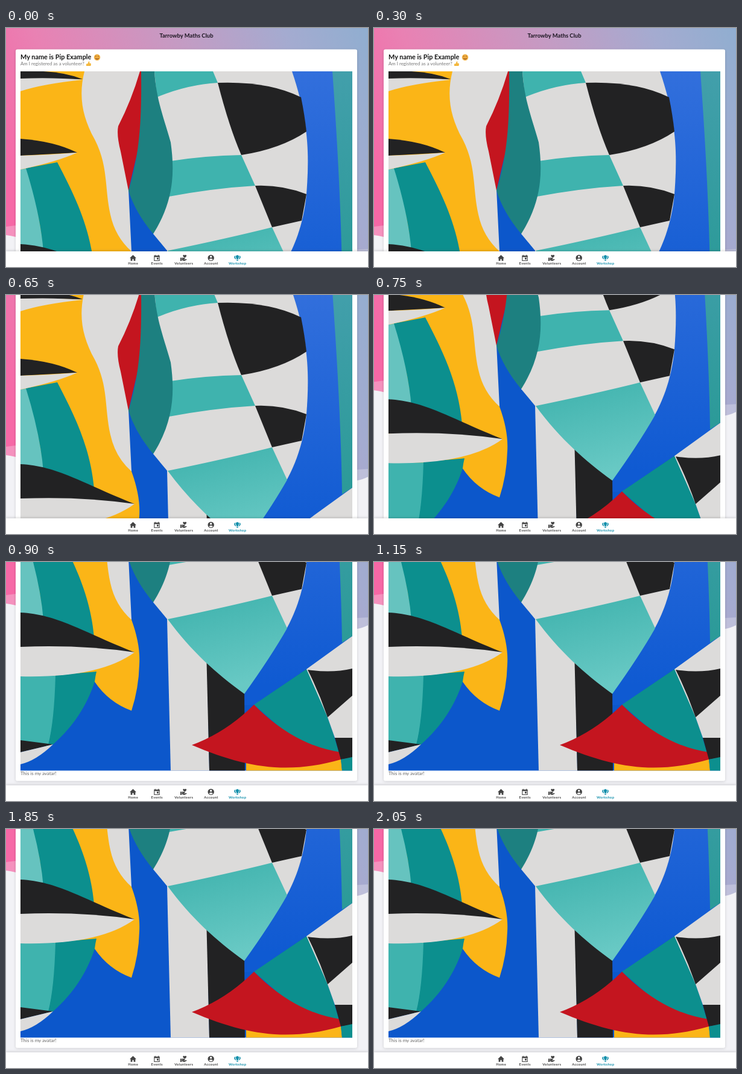
Write an HTML page that moves like this. It is 600 by 397 pixels and loops after 2100 ms.

```html
<!DOCTYPE html>
<html lang="en">
<head>
<meta charset="utf-8">
<title>Profile page scroll</title>
<style>
  html, body { margin: 0; width: 100%; height: 100%; overflow: hidden; background: #f2f2f6; }
  svg { display: block; width: 100vw; height: 100vh; }
  text { font-family: Lato, "Open Sans", sans-serif; }
  .white { fill: #dcdbda; }
  .black { fill: #222223; }
  .yellow { fill: #fbb517; }
  .teal { fill: #0c8f8e; }
  .aqua { fill: #3fb3ae; }
  .pale { fill: #66c3bf; }
  .deep { fill: #1d8080; }
  .blue { fill: #0c57cb; }
  .red { fill: #c4151f; }
  .nav { fill: #444; font-size: 5.7px; font-weight: 700; text-anchor: middle; letter-spacing: .38px; }
  .nav .active, .active { fill: #128fab; }
</style>
</head>
<body>
<svg viewBox="0 0 600 397" preserveAspectRatio="none">
  <defs>
    <linearGradient id="sky" gradientUnits="userSpaceOnUse" x1="0" y1="240" x2="600" y2="0">
      <stop offset="0" stop-color="#f668a6"/>
      <stop offset=".2" stop-color="#e981b3"/>
      <stop offset=".55" stop-color="#c39cc4"/>
      <stop offset=".8" stop-color="#a4abd0"/>
      <stop offset="1" stop-color="#90aed0"/>
    </linearGradient>
    <linearGradient id="rightBlue" gradientUnits="userSpaceOnUse" x1="0" y1="72" x2="0" y2="480">
      <stop offset="0" stop-color="#326fdc"/>
      <stop offset="1" stop-color="#0f5ad2"/>
    </linearGradient>
    <linearGradient id="rightTeal" gradientUnits="userSpaceOnUse" x1="0" y1="72" x2="0" y2="409">
      <stop offset="0" stop-color="#429fab"/>
      <stop offset="1" stop-color="#2b9a98"/>
    </linearGradient>
    <linearGradient id="kite" x1="0" y1="0" x2=".3" y2="1">
      <stop offset="0" stop-color="#3db1ac"/>
      <stop offset="1" stop-color="#68c9c4"/>
    </linearGradient>
    <filter id="shadow" x="-5%" y="-5%" width="110%" height="110%">
      <feDropShadow dx="0" dy="1" stdDeviation="2" flood-opacity=".16"/>
    </filter>
    <filter id="navShadow" x="-5%" y="-50%" width="110%" height="200%">
      <feDropShadow dx="0" dy="-1" stdDeviation="2" flood-opacity=".16"/>
    </filter>
    <clipPath id="photo"><rect x="24" y="72" width="550" height="549.5"/></clipPath>
  </defs>

  <rect width="600" height="397" fill="#f2f2f6"/>
  <g id="page">
    <path fill="url(#sky)" opacity=".7" d="M0 0H600V380Q590 385 582 386L16 347Q8 345 0 344Z"/>
    <path fill="url(#sky)" d="M0 0H600V367L582 368L16 328L0 330Z"/>
    <text x="299" y="15.6" text-anchor="middle" font-size="9.4" font-weight="700" fill="#1b1520">Tarrowby Maths Club</text>

    <rect x="16" y="35.5" width="566" height="603" rx="3" fill="#fff" filter="url(#shadow)"/>
    <text x="24" y="52.3" font-size="10.9" font-weight="700" fill="#161616">My name is Pip Example</text>
    <text x="24" y="62.3" font-size="7.85" fill="#777">Am I registered as a volunteer?</text>
    <circle cx="151" cy="48.7" r="5.2" fill="#efad40"/>
    <path d="M148 47h1.6M152.2 47h1.6M148.3 50.2Q151 53 153.7 50.2" fill="none" stroke="#8a4b1c" stroke-width="1.1"/>
    <path d="M133 59.5h2.2l2-4.2q1.5 0 1 3.2h2.2q1.2 1 0 4.5h-7.4z" fill="#f3b73d"/>

    <g clip-path="url(#photo)">
      <path class="blue" d="M24 72H574V622H24Z"/>
      <path class="yellow" d="M24 72H150L208 371Q223 412 221 445Q220 485 208 522Q170 508 147 474H24Z"/>
      <path class="white" d="M130 72C120 112 126 147 147 185C170 230 163 265 173 310Q181 347 208 371L203 268L224 72Z"/>
      <path class="red" d="M222 72H226L224 180L203 270L190 205Q183 178 186 163Q208 120 222 72Z"/>

      <path class="black" d="M24 72H62Q100 74 127 85L24 84Z"/>
      <path class="white" d="M24 84Q80 82 127 86Q60 93 24 105Z"/>
      <path class="pale" d="M24 235L40 232L64 371H24Z"/>
      <path class="teal" d="M33 233L85 223C112 275 140 330 146 400L62 371Q57 310 33 233Z"/>
      <path class="black" d="M24 184Q80 188 118 207L24 212Z"/>
      <path class="white" d="M24 212Q70 211 118 207Q85 222 24 235Z"/>
      <path class="aqua" d="M24 464H83Q82 530 70 582L24 574Z"/>
      <path class="teal" d="M82 463L150 457Q148 465 147 474C135 510 115 545 78 578H70Q80 540 82 463Z"/>
      <path class="black" d="M24 359C85 362 125 390 213 425L24 416Z"/>
      <path class="white" d="M24 416Q125 412 213 425Q155 468 24 465Z"/>
      <path class="black" d="M24 571L78 578L24 591Z"/>
      <path class="white" d="M24 591L78 578Q50 605 24 611Z"/>

      <path fill="url(#rightBlue)" d="M470 72H574V400L411 512L395 513V490L470 371Z"/>
      <path class="white" d="M246 72H474C502 155 503 210 498 276C493 330 475 367 466 384L268 371L244 342Z"/>
      <path class="aqua" d="M246 72H343L351 91Q300 94 250 115Z"/>
      <path class="black" d="M351 91Q435 88 489 115Q495 145 498 172Q455 201 390 211Q370 165 351 91Z"/>
      <path class="aqua" d="M273 221Q330 212 390 211L413 262Q345 266 270 280Z"/>
      <path class="black" d="M413 262Q457 260 498 276L490 320L441 331Z"/>
      <path class="deep" d="M224 72H246C249 120 262 150 273 190C280 240 278 288 244 342Q214 306 203 270C222 210 225 150 224 72Z"/>

      <path class="white" d="M267 370H300L333 420L337 622H273Z"/>
      <path class="black" d="M332 420L395 480L396 622H337Z"/>
      <path fill="url(#kite)" d="M268 370Q365 350 441 331L466 385Q440 431 395 494C348 460 307 423 268 370Z"/>
      <path class="yellow" d="M398 605L555 600L557 622H398Z"/>
      <path class="teal" d="M411 512L498 453Q531 516 552 592L500 590Z"/>
      <path class="red" d="M308 579Q365 558 411 512Q478 580 555 591V603C465 629 395 616 308 579Z"/>
      <path class="white" d="M574 398L498 453L533 533L545 567H574Z"/>
      <path class="black" d="M500 454Q540 460 574 452V497L533 533Q519 492 500 454ZM545 567H574V600L555 603Z"/>
      <path class="teal" d="M555 603L574 599V622H557Z"/>
      <path fill="url(#rightTeal)" d="M541 72H574V398L557 409Q555 270 541 72Z"/>
    </g>
    <text x="24" y="629" font-size="7.9" fill="#666">This is my avatar!</text>
  </g>

  <rect y="371" width="600" height="26" fill="#fff" filter="url(#navShadow)"/>
  <g fill="#444">
    <path d="M205 382.3L210.5 377l5.5 5.3h-1.6v4.4h-2.8v-3h-2.2v3h-2.8v-4.4z"/>
    <path fill-rule="evenodd" d="M245.3 378h1.3v-1.2h1.2v1.2h4.4v-1.2h1.2v1.2h1.3v9h-9.4zM246.4 380.5v5.5h7.2v-5.5zM250 381.5h2.7v3H250z"/>
    <path d="M289 381.5h2v5.5h-2zM291.6 381.5h2.5l3 1.4-.5 1h-2.2v.6h2.6l1.8-.7 1 .9-4 2.4-4.2-1.1zM296.2 382l-2.8-2.8q-.7-2.2 1.2-2.4 1 0 1.6.9.6-.9 1.6-.9 1.9.2 1.2 2.4z"/>
    <path fill-rule="evenodd" d="M339.7 376.7a5.2 5.2 0 1 0 .01 0zM339.7 378.3a1.7 1.7 0 1 1-.01 0zM336.5 384.2q3.2-2.4 6.4 0-1.1 1.9-3.2 2t-3.2-2z"/>
  </g>
  <g class="active">
    <path d="M383.5 377.2a2.7 2.7 0 0 1 2.6 3.4l-1.4 3.4h-2.4l-1.4-3.4a2.7 2.7 0 0 1 2.6-3.4zM382.2 384.8h2.6v1.7h-2.6z"/>
    <path d="M380.2 378q-1 3 1.2 6.4-3-1-3.2-4.2 .4-1.6 2-2.2zM386.8 378q1 3-1.2 6.4 3-1 3.2-4.2-.4-1.6-2-2.2z"/>
  </g>
  <g class="nav">
    <text x="210.7" y="392.8">Home</text>
    <text x="250.2" y="392.8">Events</text>
    <text x="294.7" y="392.8">Volunteers</text>
    <text x="340" y="392.8">Account</text>
    <text x="383.7" y="392.8" class="active">Workshop</text>
  </g>
</svg>
<script>
  const LOOP = 2100, STEP = 50;
  const SCROLL = { start: 519, duration: 373, distance: 275 };
  const page = document.getElementById("page");
  const origin = performance.now();

  function scrollAt(time) {
    const p = Math.min(1, Math.max(0, (time - SCROLL.start) / SCROLL.duration));
    return SCROLL.distance * p * p * (3 - 2 * p);
  }

  function draw(now) {
    const elapsed = Math.max(0, now - origin) % LOOP;
    const time = Math.floor(elapsed / STEP) * STEP;
    page.setAttribute("transform", `translate(0 ${-scrollAt(time).toFixed(2)})`);
    requestAnimationFrame(draw);
  }
  draw(origin);
</script>
</body>
</html>
```
